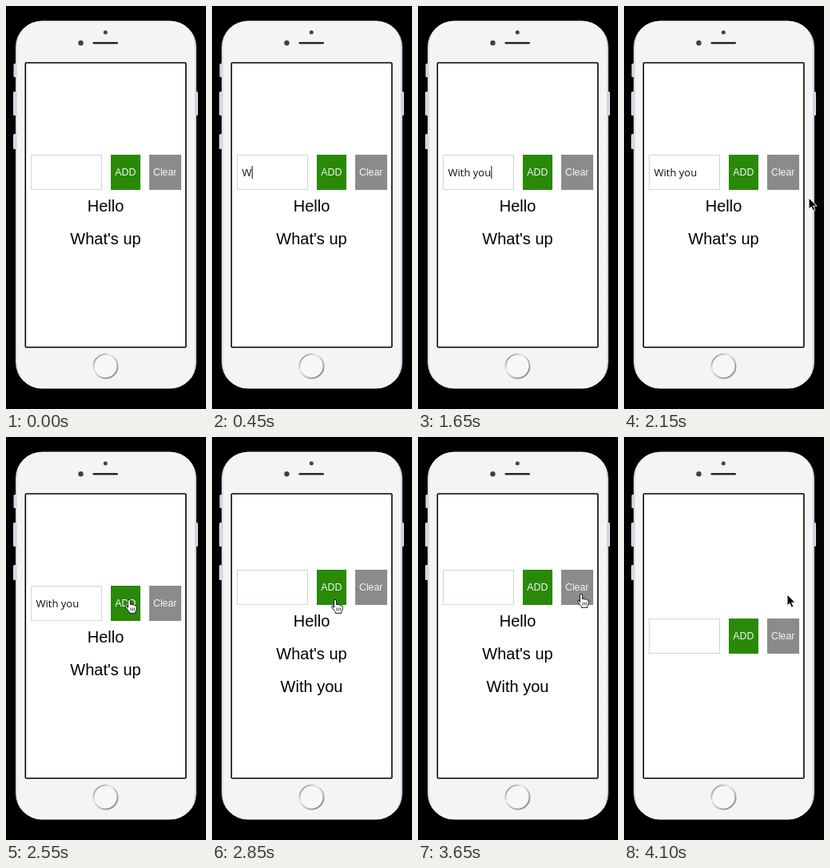
Recreate the animation shown at these times as an HTML page. Size 250x504 px, loop 4.15 s.

```html
<!DOCTYPE html>
<html lang="en">
<head>
<meta charset="utf-8">
<title>List demo</title>
<style>
  html, body { margin: 0; width: 100%; height: 100%; overflow: hidden; background: #000; }
  svg { display: block; width: 250px; height: 504px; }
  text { font-family: "Liberation Sans", Arial, sans-serif; }
  .item { font-size: 20px; text-anchor: middle; }
  .label { font-size: 12.3px; text-anchor: middle; fill: #f4f6f4; }
  #typed { font: 13px "Open Sans", "Noto Sans", sans-serif; fill: #111; white-space: pre; }
</style>
</head>
<body>
<svg viewBox="0 0 250 504">
  <defs>
    <linearGradient id="edge" x1="0" x2="1" y1="0" y2="0">
      <stop offset="0" stop-color="#d5d2df"/>
      <stop offset=".03" stop-color="#f8f7fb"/>
      <stop offset=".97" stop-color="#f8f7fb"/>
      <stop offset="1" stop-color="#cbc8d8"/>
    </linearGradient>
    <linearGradient id="metal" x1="0" x2="1" y1="0" y2="1">
      <stop offset="0" stop-color="#777"/>
      <stop offset=".35" stop-color="#e8e8e8"/>
      <stop offset=".6" stop-color="#bbb"/>
      <stop offset="1" stop-color="#777"/>
    </linearGradient>
  </defs>

  <rect width="250" height="504"/>
  <g fill="#d9d6e3">
    <rect x="9.5" y="72" width="4" height="17" rx="1.5"/>
    <rect x="9" y="107" width="4" height="30" rx="1.5"/>
    <rect x="9" y="160" width="4" height="19" rx="1.5"/>
    <rect x="236" y="107" width="4" height="30" rx="1.5"/>
  </g>
  <rect x="12" y="18.5" width="226" height="460" rx="33" fill="url(#edge)"/>
  <rect x="14" y="20" width="222" height="456.5" rx="31" fill="#f4f4f5"/>
  <circle cx="124.3" cy="33" r="2.5" fill="#454149"/>
  <circle cx="93.5" cy="46.3" r="3.2" fill="#403d4b"/>
  <rect x="108.5" y="45" width="31.5" height="2.6" rx="1.3" fill="#29272b"/>
  <circle cx="124.5" cy="450.5" r="15" fill="#f7f7f7" stroke="url(#metal)" stroke-width="2"/>
  <rect x="24.3" y="71" width="200.6" height="355.8" rx="1" fill="#fff" stroke="#050505" stroke-width="1.6"/>

  <g id="form">
    <rect x="31.5" y="186.5" width="88" height="43" fill="#fff" stroke="#cbd8d9"/>
    <text id="typed" x="37.5" y="213"></text>
    <rect id="caret" y="200" width="1" height="16" fill="#111"/>
    <rect x="131" y="186" width="37" height="44" fill="#2a8909"/>
    <text class="label" x="149.3" y="212.3">ADD</text>
    <rect x="179" y="186" width="40" height="44" fill="#8b8b8b"/>
    <text class="label" x="198.7" y="212.3">Clear</text>
    <text class="item" x="124.5" y="257.3">Hello</text>
    <text class="item" x="124.5" y="298.3">What's up</text>
    <text class="item" x="124.5" y="339.3">With you</text>
  </g>

  <g id="pointer">
    <path id="arrow" d="M0 0V14L3.1 11.1L5.4 16.3L7.9 15.2L5.6 10.1H10Z"
      fill="#000" stroke="#fff" stroke-width="1" stroke-linejoin="round"/>
    <g id="hand" fill="#fff" stroke="#111" stroke-width="1" stroke-linejoin="round" stroke-linecap="round">
      <path d="M-1.6 9V1Q-1.4-.7 0-.7T1.5 1V5.5Q3.2 4.4 4.1 6Q5.8 5.1 6.8 6.8Q9.2 6.2 9.2 8.6V11.5Q8.8 13.2 7.8 14.6V16.3H.2V14.8Q-1.2 13.5-2 12L-4.4 8.8Q-4.6 6.8-3 7.2Z"/>
      <path d="M2 10V13M4.2 10V13M6.4 10V13" stroke-width=".8"/>
    </g>
  </g>
</svg>
<script>
  const LOOP = 4150, STEP = 50;
  const ADD_AT = 2650, CLEAR_AT = 3700, CARET_OFF = 2000;
  const PHRASE = "With you";
  const KEYS = [400, 550, 650, 750, 1150, 1250, 1400, 1550];
  // time, x, y of the pointer tip
  const PATH = [
    [2050, 248, 248], [2150, 231, 240], [2300, 189, 221], [2500, 154, 204],
    [2950, 154, 204], [3100, 176, 201], [3300, 204, 197], [4150, 204, 197]
  ];

  const el = id => document.getElementById(id);
  const form = el("form"), typed = el("typed"), caret = el("caret");
  const pointer = el("pointer"), arrow = el("arrow"), hand = el("hand");
  const items = [...document.querySelectorAll(".item")];
  const show = (node, on) => node.style.display = on ? "" : "none";

  function pointerAt(t) {
    const i = PATH.findIndex(p => p[0] > t);
    if (i < 1) return null;
    const [t0, x0, y0] = PATH[i - 1], [t1, x1, y1] = PATH[i];
    const k = (t - t0) / (t1 - t0);
    return [x0 + (x1 - x0) * k, y0 + (y1 - y0) * k];
  }

  function draw(t) {
    const count = t >= CLEAR_AT ? 0 : t >= ADD_AT ? 3 : 2;
    // the column stays centred, so each item moves it by half a row
    const shift = Math.trunc((2 - count) * 20.5);
    form.setAttribute("transform", `translate(0 ${shift})`);
    items.forEach((item, i) => show(item, i < count));

    const length = t < ADD_AT ? KEYS.filter(k => k <= t).length : 0;
    typed.textContent = PHRASE.slice(0, length);
    show(caret, length > 0 && t < CARET_OFF);
    caret.setAttribute("x", 37.7 + (length ? typed.getComputedTextLength() : 0));

    const tip = pointerAt(t);
    show(pointer, tip);
    if (!tip) return;
    const [x, y] = tip;
    const inRow = y >= 186 + shift && y <= 230 + shift;
    const over = inRow && (x >= 131 && x <= 168 || x >= 179 && x <= 219);
    show(arrow, !over);
    show(hand, over);
    pointer.setAttribute("transform", `translate(${x} ${y})`);
  }

  const start = performance.now();
  function tick() {
    const t = (performance.now() - start) % LOOP;
    draw(Math.floor(t / STEP) * STEP);
    requestAnimationFrame(tick);
  }
  tick();
</script>
</body>
</html>
```
